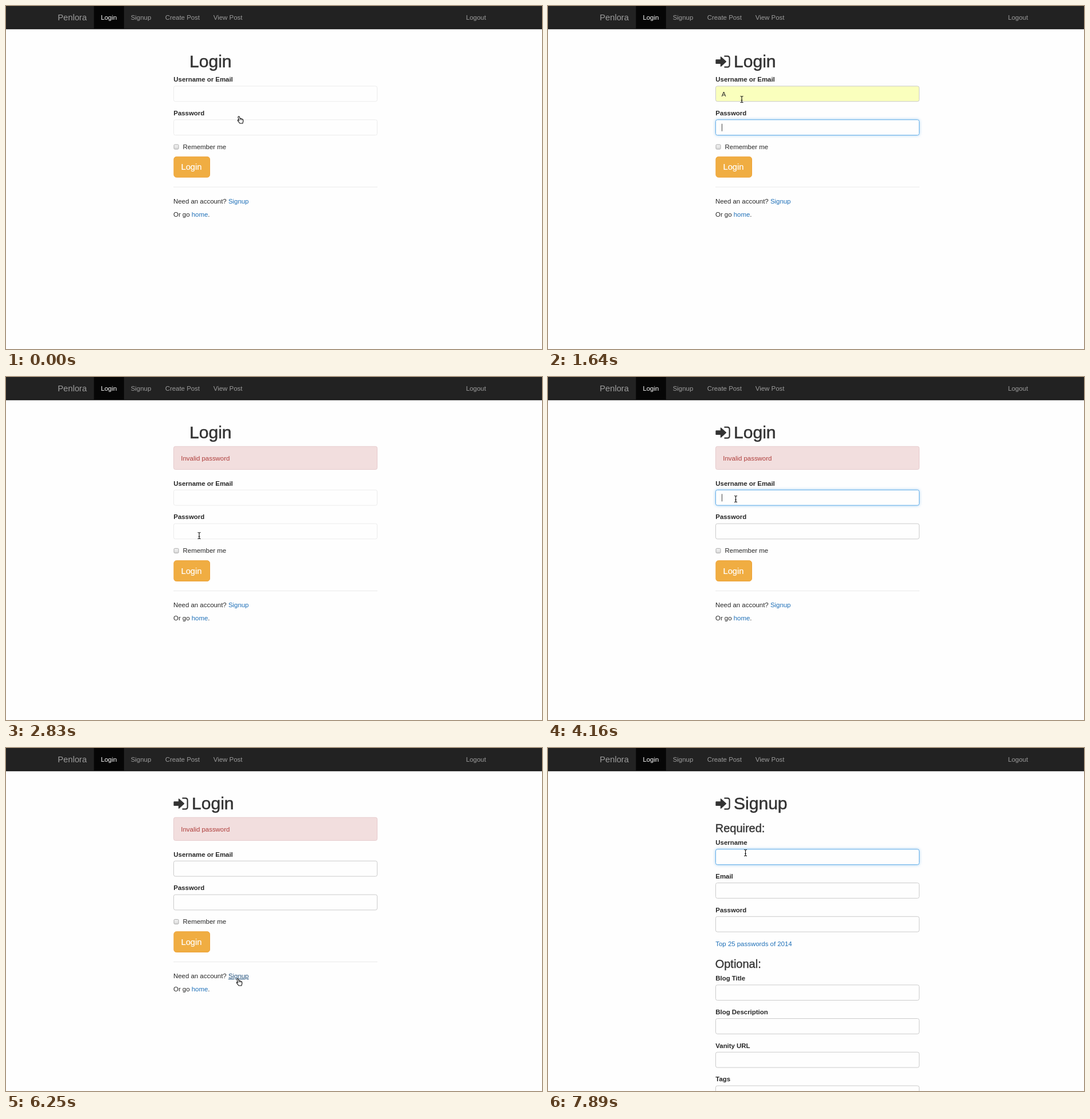
Animation of 935 by 599 pixels, one loop 8000 ms. Source, as an HTML page:

```html
<!DOCTYPE html>
<html lang="en">
<head>
<meta charset="utf-8">
<title>Login form</title>
<style>
  html, body { margin: 0; width: 100%; height: 100%; overflow: hidden; background: #fefefe; }
  svg { display: block; width: 935px; height: 599px; }
  text { font: 11.43px "Liberation Sans", Arial, sans-serif; fill: #262626; white-space: pre; }
  .label { font-weight: bold; }
  .nav { fill: #9d9d9d; }
  .brand { font-size: 14.7px; }
  .on { fill: #fff; }
  .h1, .h3 { fill: #333; stroke: #333; stroke-width: .5; font-size: 30px; }
  .h3 { font-size: 20px; stroke-width: .35; }
  .button { font-size: 14.7px; fill: #fff; stroke: #fff; stroke-width: .2; }
  .link { fill: #1f70b8; }
  .hover { fill: #23527c; text-decoration: underline; }
  .error { fill: #ae3d3a; }
</style>
</head>
<body>
<svg id="stage" viewBox="0 0 935 599"></svg>
<script>
const LOOP = 8000;
const LEFT = 292.5, WIDTH = 355;
const ALERT_SHIFT = 57.4;

// Each step changes part of the state and holds until the next one.
const steps = [
  [0, { page: 'login', alert: false, edge: '#ececec', icon: false, user: '', pass: false,
        focus: -1, glow: 1, caret: 0, hot: false, linkHot: false, cursor: ['hand', 409, 199] }],
  [150, { edge: '#dadada', cursor: ['hand', 392, 182] }],
  [295, { edge: '#cbcbcb', icon: true, cursor: ['beam', 374, 165] }],
  [440, { cursor: ['beam', 362, 155] }],
  [740, { cursor: ['beam', 349, 145] }],
  [890, { cursor: ['beam', 342.5, 140] }],
  [1190, { cursor: ['beam', 338.5, 152] }],
  [1340, { focus: 0, glow: .6, caret: 303.5 }],
  [1490, { glow: 1, user: 'A', caret: 311 }],
  [1640, { focus: 1, caret: 303.5, cursor: ['beam', 338, 163] }],
  [1790, { pass: true, caret: 307, cursor: ['beam', 337, 205] }],
  [1940, { cursor: ['arrow', 337, 250] }],
  [2090, { hot: true, cursor: ['hand', 337, 279] }],
  [2390, { caret: 0 }],
  [2540, { focus: -1 }],
  [2690, { alert: true, icon: false, user: '', pass: false, hot: false, edge: '#ececec',
           cursor: ['beam', 337, 277] }],
  [2840, { edge: '#dadada' }],
  [2990, { edge: '#cbcbcb', icon: true }],
  [3140, { cursor: ['arrow', 337, 288] }],
  [3290, { cursor: ['arrow', 336, 297] }],
  [3430, { cursor: ['arrow', 336, 306] }],
  [3580, { cursor: ['arrow', 335, 294] }],
  [3730, { cursor: ['beam', 332, 262] }],
  [3880, { cursor: ['beam', 329, 225] }],
  [4010, { focus: 0, glow: .6, caret: 303.5, cursor: ['beam', 327.5, 214] }],
  [4160, { glow: 1, cursor: ['beam', 327.5, 213] }],
  [4460, { caret: 0 }],
  [4760, { cursor: ['beam', 332, 216] }],
  [4910, { cursor: ['beam', 360, 226] }],
  [5060, { caret: 303.5, cursor: ['beam', 398, 241] }],
  [5210, { cursor: ['beam', 415, 260] }],
  [5360, { cursor: ['arrow', 415, 325] }],
  [5500, { caret: 0, cursor: ['arrow', 412, 385] }],
  [5650, { linkHot: true, cursor: ['hand', 409, 401] }],
  [5800, { cursor: ['hand', 407, 409] }],
  [5950, { focus: -1 }],
  [6550, { linkHot: false }],
  [6850, { page: 'signup', icon: false, edge: '#f1f1f1', cursor: ['beam', 390, 285] }],
  [7000, { edge: '#ececec', cursor: ['beam', 371, 171] }],
  [7150, { edge: '#dadada', cursor: ['beam', 356, 174] }],
  [7300, { edge: '#cbcbcb', icon: true, cursor: ['beam', 348, 179] }],
  [7450, { focus: 0, glow: .6, caret: 303.5, cursor: ['beam', 344.5, 182] }],
  [7590, { glow: 1, cursor: ['beam', 344.5, 183] }],
  [7890, { caret: 0 }],
];

const text = (x, y, content, kind = '') => `<text x="${x}" y="${y}" class="${kind}">${content}</text>`;
const span = (content, kind) => `<tspan class="${kind}">${content}</tspan>`;
const box = (x, y, w, h, fill, more = '') =>
  `<rect x="${x}" y="${y}" width="${w}" height="${h}" fill="${fill}" ${more}/>`;

const cursors = {
  beam: `<path d="M-2.5-5.5Q0-5.5 0-4Q0-5.5 2.5-5.5M0-4.5V4.5M-2.5 5.5Q0 5.5 0 4Q0 5.5 2.5 5.5M-1.3 1.5H1.3"
    fill="none" stroke="#111" stroke-width="1.1"/>`,
  arrow: `<path d="M-3.3-6V4.2L-1 2.1L.8 6L2.7 5.2L1 1.4H4.2Z" fill="#000" stroke="#fff" stroke-width=".9"/>`,
  hand: `<path d="M-3.6-6Q-2.3-6.8-1.7-5.3L-.8-2.4Q.3-3 1.1-2.1Q2.2-2.6 2.8-1.5Q4.3-1.7 4.6-.2L4.8 2.2L3.8 6H-1
    L-4.4 1.6Q-5.4 0-4-.2L-2.6.7L-4.1-4.4Q-4.4-5.5-3.6-6Z" fill="#fff" stroke="#111" stroke-width="1.1"/>
    <path d="M-.6-2.2V.3M1.2-1.8V.5M3-1.2V.7" stroke="#111" stroke-width=".7"/>`,
};

const drawNav = () =>
  box(0, 0, 935, 40, '#222') + box(0, 39.3, 935, 1.2, '#080808') + box(153.4, 0, 52.4, 40, '#060606') +
  text(90.3, 25, 'Penlora', 'nav brand') +
  text(165.4, 24, 'Login', 'nav on') +
  text(217.7, 24, 'Signup', 'nav') +
  text(277.7, 24, 'Create Post', 'nav') +
  text(361.8, 24, 'View Post', 'nav') +
  text(802.4, 24, 'Logout', 'nav');

const signInIcon = `<path d="M292.4 94.4Q292.4 93.2 293.6 93.2H300.8V89.3Q300.9 87.7 302.3 88.7L310.8 96.4
  Q311.4 97.1 310.8 97.8L302.3 105.6Q300.9 106.5 300.8 105V101.1H293.6Q292.4 101.1 292.4 99.9Z" fill="#333"/>
  <path d="M308.3 87.7H313Q316.6 87.7 316.6 91.3V103Q316.6 106.6 313 106.6H308.3"
  fill="none" stroke="#333" stroke-width="2.2" stroke-linecap="round"/>`;

const drawTitle = (state, title) =>
  (state.icon ? signInIcon : '') + text(state.icon ? 324.1 : 320.1, 107.4, title, 'h1');

function drawField(state, index, label, y, value = '') {
  const focused = state.focus === index;
  const edge = focused ? '#66afe9' : state.edge;
  const glow = focused ? `style="filter:drop-shadow(0 0 2.8px rgba(102,175,233,${.65 * state.glow}))"` : '';
  const caret = focused && state.caret ? box(state.caret - .5, y + 7, 1, 13, '#444') : '';
  return text(292.3, y - 7.7, label, 'label') +
    box(LEFT, y, WIDTH, 26.8, value ? '#faffbd' : '#fefefe', `rx="3" stroke="${edge}" ${glow}`) +
    text(302.8, y + 17.6, value) + caret;
}

function drawLogin(state) {
  const alert = box(LEFT, 121.3, WIDTH, 40.2, '#f2dede', 'rx="3" stroke="#e6cbcd"') +
    text(305.3, 145.6, 'Invalid password', 'error');
  const form =
    drawField(state, 0, 'Username or Email', 139.9, state.user) +
    drawField(state, 1, 'Password', 198.7) +
    (state.pass ? '<circle cx="305.2" cy="212.2" r="1.5" fill="#333"/>' : '') +
    box(293, 242, 8, 8, 'url(#check)', 'rx="1.5" stroke="#aaa"') +
    text(308.6, 250, 'Remember me') +
    box(292.9, 263.3, 62.6, 35.8, state.hot ? '#ed9c08' : '#f0ad42',
      `rx="4.5" stroke="${state.hot ? '#dc900c' : '#eea236'}"`) +
    text(305.5, 286.4, 'Login', 'button') +
    box(292, 315.6, 356, 1, '#eaeaea') +
    text(292, 344.5, 'Need an account? ' + span('Signup', state.linkHot ? 'link hover' : 'link')) +
    text(292, 367.9, 'Or go ' + span('home', 'link') + '.');
  return drawTitle(state, 'Login') + (state.alert ? alert : '') +
    `<g transform="translate(0 ${state.alert ? ALERT_SHIFT : 0})">${form}</g>`;
}

function drawSignup(state) {
  const fields = (first, top, labels) =>
    labels.map((label, i) => drawField(state, first + i, label, top + i * 58.7)).join('');
  return drawTitle(state, 'Signup') +
    text(291.7, 146.6, 'Required:', 'h3') +
    fields(0, 176.9, ['Username', 'Email', 'Password']) +
    text(292.3, 345.8, 'Top 25 passwords of 2014', 'link') +
    text(291.7, 383.6, 'Optional:', 'h3') +
    fields(3, 413.8, ['Blog Title', 'Blog Description', 'Vanity URL', 'Tags']);
}

const defs = `<defs><linearGradient id="check" x2="0" y2="1">
  <stop stop-color="#f6f6f6"/><stop offset="1" stop-color="#d8d8d8"/></linearGradient></defs>`;
const stage = document.getElementById('stage');
let shown = -1;

function frame(now) {
  const time = now % LOOP;
  const passed = steps.filter(([start]) => start <= time);
  if (passed.length !== shown) {
    shown = passed.length;
    const state = Object.assign({}, ...passed.map(([, change]) => change));
    const [kind, x, y] = state.cursor;
    stage.innerHTML = defs + box(0, 0, 935, 599, '#fefefe') + drawNav() +
      (state.page === 'login' ? drawLogin(state) : drawSignup(state)) +
      `<g transform="translate(${x} ${y})">${cursors[kind]}</g>`;
  }
  requestAnimationFrame(frame);
}
frame(0);
</script>
</body>
</html>
```
